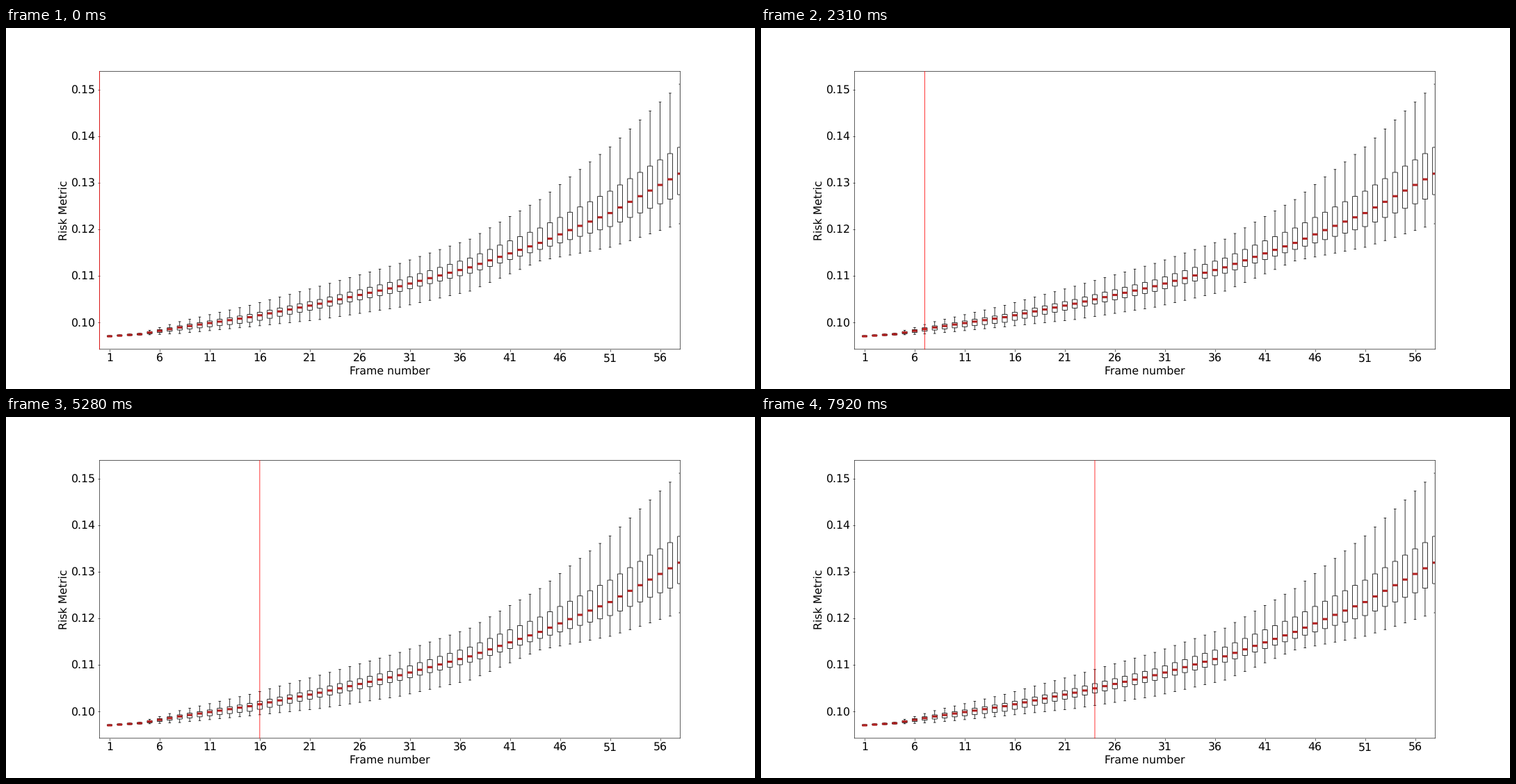
Recreate the animation shown at these times as a matplotlib script. Size 1077 by 520 pixels, loop 8000 ms.

```python
import numpy as np
import matplotlib.pyplot as plt
from matplotlib.animation import FuncAnimation

LOOP_MS = 8000
INTERVAL_MS = 20
STEP_MS = 330          # the marker advances one box per step
SCALE = 0.785          # shrinks the default line and text sizes
BOX_WIDTH = 0.5
CAP_WIDTH = 0.25

plt.rcParams.update({
    "font.family": "DejaVu Sans",
    "font.size": 20 * SCALE,
    "text.hinting": "none",
    "path.snap": False,
    "axes.linewidth": 0.8 * SCALE,
    "axes.labelpad": 4 * SCALE,
})

x = np.arange(1, 59)
KNOTS = [1, 4, 8, 15, 22, 30, 37, 44, 51, 58]


def curve(*thousandths):
    """Metric at every x, interpolated between the knots."""
    return np.interp(x, KNOTS, thousandths) / 1000


high = curve(97.2, 97.7, 100.2, 103.7, 107.8, 112.7, 117.9, 126.4, 137.7, 151.15)
upper = curve(97.2, 97.65, 99.3, 101.75, 104.95, 109.15, 113.85, 120.3, 128.2, 137.6)
median = curve(97.05, 97.5, 98.95, 101.15, 104.05, 107.8, 111.85, 117.1, 123.5, 131.95)
lower = curve(97, 97.35, 98.4, 100.05, 103.1, 106.7, 110.6, 115.7, 120.6, 127.45)
low = curve(97, 97.3, 97.65, 99.1, 100.65, 103.3, 106.75, 113.25, 116.15, 121.2)

fig = plt.figure(figsize=(1077 / 72, 520 / 72), dpi=72, facecolor="white")
ax = fig.add_axes([0.125, 0.11, 0.775, 0.77])


def bars(y, width, **style):
    ax.hlines(y, x - width / 2, x + width / 2, **style)


thin = dict(color="black", linewidth=SCALE)
for box_edge, whisker_end in ((upper, high), (lower, low)):
    ax.vlines(x, box_edge, whisker_end, **thin)
    bars(box_edge, BOX_WIDTH, **thin)
    bars(whisker_end, CAP_WIDTH, **thin)
for side in (-BOX_WIDTH / 2, BOX_WIDTH / 2):
    ax.vlines(x + side, lower, upper, **thin)
bars(median, BOX_WIDTH, color="firebrick", linewidth=4 * SCALE)

marker = ax.axvline(0, color="red", linewidth=SCALE, zorder=3, clip_on=False)

ax.set_xlim(0, 58)
ax.set_ylim(0.094264, 0.153918)
ax.set_xticks(range(1, 58, 5))
ax.set_yticks(np.linspace(0.10, 0.15, 6))
ax.yaxis.set_major_formatter("{x:.2f}")
ax.tick_params(length=3.5 * SCALE, width=0.8 * SCALE, pad=3.5 * SCALE)
ax.set_xlabel("Frame number")
ax.set_ylabel("Risk Metric")


def update(i):
    # sampled mid-frame, since steps do not fall on the frame grid
    step = int((i + 0.5) * INTERVAL_MS // STEP_MS)
    marker.set_xdata([step, step])
    return [marker]


anim = FuncAnimation(fig, update, frames=LOOP_MS // INTERVAL_MS,
                     interval=INTERVAL_MS, repeat=True, repeat_delay=0)
plt.show()
```
